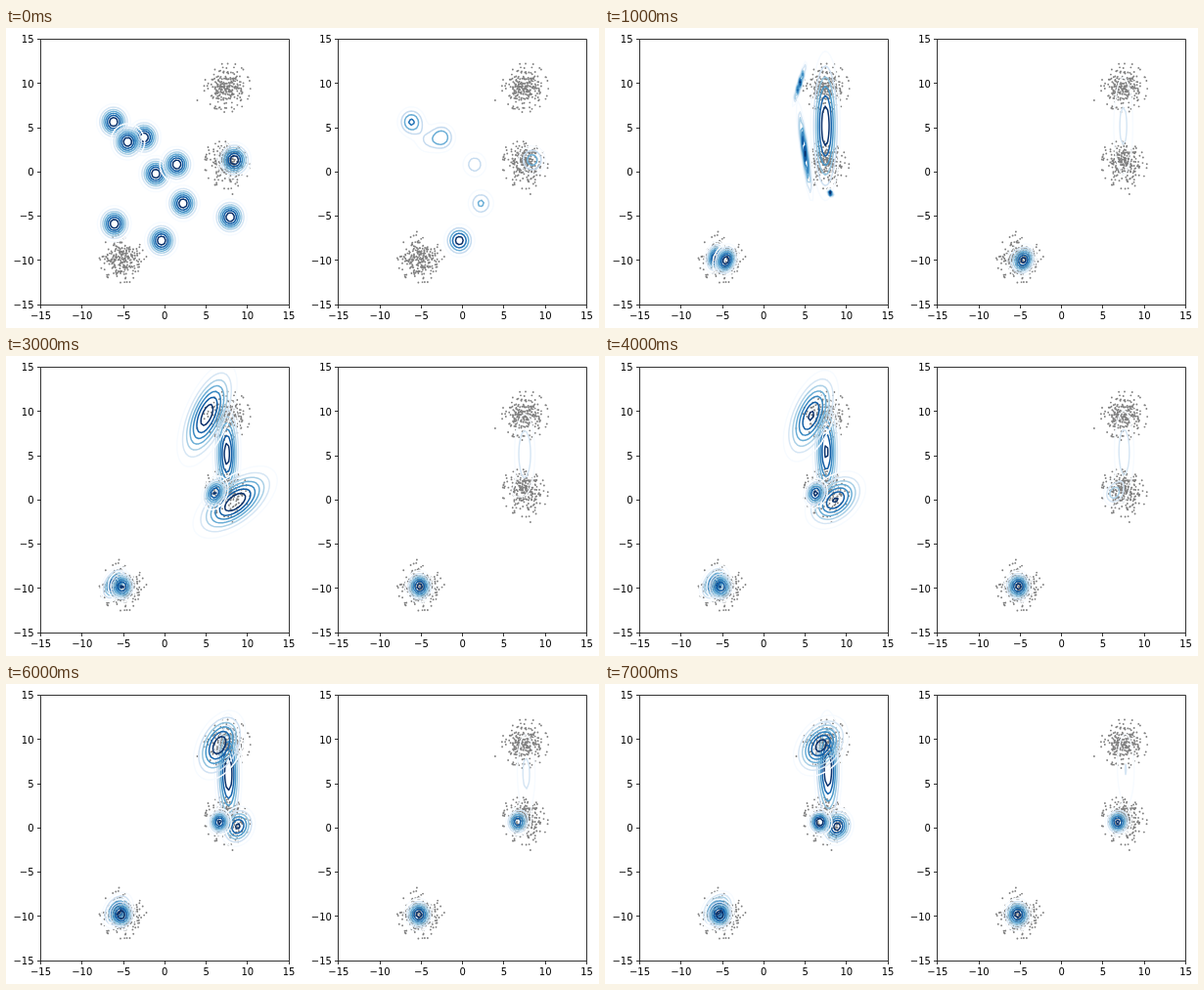
Recreate the animation shown at these times as an HTML page. Size 606x307 px, loop 8 s.

```html
<!DOCTYPE html>
<html lang="en">
<head>
<meta charset="utf-8">
<title>Gaussian mixture fit</title>
<style>
  html, body { margin: 0; width: 100%; height: 100%; overflow: hidden; background: #fff; }
  svg { display: block; width: 606px; height: 307px; }
  text { font: 10px "DejaVu Sans", sans-serif; fill: #000; }
</style>
</head>
<body>
<svg id="stage" viewBox="0 0 606 307" xmlns="http://www.w3.org/2000/svg"></svg>
<script>
const W = 253.6, H = 271.8, TOP = 11.4, LEFTS = [35.5, 339.9];
const STEP_MS = 1000, STATES = 8, N = 100;
const px = x => (x + 15) / 30 * W;
const py = y => TOP + (15 - y) / 30 * H;

// Colour ramp from near white to navy
const RAMP = ['f7fbff', 'deebf7', 'c6dbef', '9ecae1', '6baed6', '4292c6', '2171b5', '08519c', '08306b']
  .map(h => [0, 2, 4].map(i => parseInt(h.slice(i, i + 2), 16)));
function blue(t) {
  const i = Math.min(7, Math.floor(t * 8)), f = t * 8 - i;
  return 'rgb(' + RAMP[i].map((v, k) => Math.round(v + (RAMP[i + 1][k] - v) * f)).join() + ')';
}

// First state: unit Gaussians as x, y, weight
const START = [
  [-6.2, 5.65, 4.2], [-2.5, 3.9, 3.8], [-4.5, 3.4, 1.6], [-1.1, -0.2, 0.1], [1.45, 0.85, 2.6],
  [8.4, 1.35, 3.6], [2.2, -3.55, 3.2], [7.9, -5.1, 0.1], [-6.1, -5.85, 0.1], [-0.4, -7.75, 5.6]
].map(([x, y, w]) => [x, y, 1, 1, 0, w]);

// Tracks of later states: state, x, y, sx, sy, correlation, weight
const lowLeft = [
  [1, -5.9, -9.65, 0.62, 0.9, 0.2, 1.5],
  [2, -6.35, -9.6, 0.75, 0.95, 0.5, 0.5],
  [3, -6.1, -9.5, 0.85, 1.0, 0.4, 0.3],
  [7, -5.6, -9.25, 1.0, 1.05, 0.3, 0.2]
];
const lowMain = [
  [1, -4.6, -9.98, 0.76, 0.9, 0.2, 7.4],
  [2, -5.15, -9.78, 0.82, 0.88, 0, 7.4],
  [7, -5.32, -9.8, 0.87, 0.9, 0, 7.4]
];
const tall = [
  [1, 7.45, 5.2, 0.9, 4.3, 0, 2.25],
  [2, 7.5, 5.2, 0.82, 3.25, 0, 2.9],
  [3, 7.5, 5.2, 0.85, 3.1, 0, 2.85],
  [5, 7.6, 5.7, 0.82, 3.5, -0.05, 2.5],
  [7, 7.75, 6.6, 0.84, 3.4, -0.05, 2.03]
];
const wide = [
  [1, 8.05, -2.4, 0.2, 0.24, -0.4, 0],
  [2, 7.05, -2.7, 4, 2.7, 0.65, 0],
  [3, 8.5, -0.25, 2.5, 2, 0.6, 0],
  [5, 8.8, 0.2, 1.2, 1.3, 0.2, 0],
  [7, 8.85, 0.15, 1, 1.05, 0.1, 0]
];
const upper = [
  [1, 4.35, 10, 0.45, 1.35, 0.93, 0],
  [2, 3.7, 7.8, 3.2, 5.2, 0.78, 0],
  [3, 5.1, 9.6, 1.8, 2.9, 0.6, 0],
  [5, 6.3, 9.4, 1.55, 2.3, 0.45, 0],
  [7, 6.9, 9.3, 1.65, 1.7, 0.35, 0]
];
const small = [
  [1, 4.95, 2.3, 0.5, 2.9, -0.86, 0],
  [2, 5.4, 0.65, 1.3, 1.6, 0.6, 0.3],
  [3, 6.05, 0.8, 0.8, 0.95, 0.25, 0.8],
  [5, 6.45, 0.7, 0.68, 0.75, 0.05, 6.2],
  [7, 6.75, 0.65, 0.74, 0.76, 0, 7.2]
];
const TRACKS = [lowLeft, lowMain, tall, wide, upper, small];

function at(track, s) {
  let i = 0;
  while (i < track.length - 2 && track[i + 1][0] <= s) i++;
  const a = track[i], b = track[i + 1], f = (s - a[0]) / (b[0] - a[0]);
  return a.slice(1).map((v, k) => v + (b[k + 1] - v) * f);
}
const parts = s => s ? TRACKS.map(t => at(t, s)) : START;

// Density of weighted Gaussians on a square grid
const coord = i => -15 + 30 * i / (N - 1);
function sample(list) {
  const z = new Float64Array(N * N);
  for (const [mx, my, sx, sy, r, w] of list)
    for (let j = 0; j < N; j++) {
      const v = (coord(j) - my) / sy;
      for (let i = 0; i < N; i++) {
        const u = (coord(i) - mx) / sx;
        z[j * N + i] += w * Math.exp(-(u * u - 2 * r * u * v + v * v) / (2 * (1 - r * r)));
      }
    }
  return z;
}

// Marching squares for one level
function outline(z, level) {
  let d = '';
  for (let j = 0; j < N - 1; j++)
    for (let i = 0; i < N - 1; i++) {
      const c = [[i, j], [i + 1, j], [i + 1, j + 1], [i, j + 1]];
      const v = c.map(([a, b]) => z[b * N + a]);
      const hi = v.filter(q => q > level).length;
      if (!hi || hi === 4) continue;
      const cuts = [];
      for (let k = 0; k < 4; k++) {
        const m = (k + 1) % 4;
        if ((v[k] > level) === (v[m] > level)) continue;
        const f = (level - v[k]) / (v[m] - v[k]);
        const x = coord(c[k][0] + (c[m][0] - c[k][0]) * f);
        const y = coord(c[k][1] + (c[m][1] - c[k][1]) * f);
        cuts.push(px(x).toFixed(2) + ' ' + py(y).toFixed(2));
      }
      for (let k = 0; k < cuts.length; k += 2) d += 'M' + cuts[k] + 'L' + cuts[k + 1];
    }
  return d;
}

function contours(z, step) {
  const n = Math.ceil(z.reduce((a, b) => Math.max(a, b)) / step) - 1;
  let out = '';
  for (let k = 1; k <= n; k++)
    out += `<path d="${outline(z, k * step)}" stroke="${blue(n > 1 ? (k - 1) / (n - 1) : 0)}"/>`;
  return out;
}

// Round step that splits a range into at most eight
function niceStep(max) {
  const raw = max / 8, mag = 10 ** Math.floor(Math.log10(raw));
  return mag * [1, 1.5, 2, 2.5, 3, 4, 5, 6, 8, 10].find(s => s * mag >= raw * 0.99999);
}

function single([x, y, sx, sy, r]) {
  const peak = 1 / (2 * Math.PI * sx * sy * Math.sqrt(1 - r * r));
  const z = sample([[x, y, sx, sy, r, peak]]);
  return contours(z, niceStep(z.reduce((a, b) => Math.max(a, b))));
}

// Seeded point clouds
let seed = 77;
function rnd() {
  seed = (seed * 16807) % 2147483647;
  return seed / 2147483647;
}
function cloud(cx, cy, spread, count) {
  let d = '';
  for (let n = 0; n < count; n++) {
    const r = Math.min(2.5, Math.sqrt(-2 * Math.log(rnd()))) * spread, a = rnd() * 2 * Math.PI;
    d += dot(px(cx + r * Math.cos(a)), py(cy + r * Math.sin(a)));
  }
  return d;
}
const dot = (x, y) => `M${x.toFixed(2)} ${y.toFixed(2)}h0`;
const strays = [[160, 74], [171, 122], [196, 170], [80, 208.5], [108, 234], [88, 260], [91, 260], [63, 234]];
const points = cloud(7.55, 9.55, 1.12, 250) + cloud(7.55, 0.85, 1.1, 250) +
  cloud(-5.2, -9.8, 1.08, 250) + strays.map(p => dot(...p)).join('');

function axes(left) {
  const snap = v => Math.floor(v) + 0.5;
  const x0 = snap(left), x1 = snap(left + W), y0 = snap(TOP), y1 = snap(TOP + H);
  let d = `M${x0} ${y0}H${x1}V${y1}H${x0}Z`, labels = '';
  for (let v = -15; v <= 15; v += 5) {
    const x = snap(left + px(v)), y = snap(py(v)), t = String(v).replace('-', '\u2212');
    d += `M${x} ${y1}v3.5M${x0} ${y}h-3.5`;
    labels += `<text x="${left + px(v)}" y="297.5" text-anchor="middle">${t}</text>` +
      `<text x="${left - 7}" y="${py(v) + 3.8}" text-anchor="end">${t}</text>`;
  }
  return `<path d="${d}" fill="none" stroke="#000" stroke-width=".8"/>${labels}`;
}

const stage = document.getElementById('stage');
stage.innerHTML = `<clipPath id="box"><rect y="${TOP}" width="${W}" height="${H}"/></clipPath>` +
  LEFTS.map(left => `<g transform="translate(${left})"><g clip-path="url(#box)" fill="none" stroke-linecap="round">
    <path d="${points}" stroke="#808080" stroke-width="1.9"/>
    <g class="rings" stroke-width="1.5"></g></g></g>${axes(left)}`).join('');

const rings = stage.querySelectorAll('.rings');
const scenes = Array.from({ length: STATES }, (_, s) => {
  const list = parts(s);
  return [list.map(single).join(''), contours(sample(list), 1)];
});

let shown = -1;
function draw(ms) {
  const s = Math.floor(ms / STEP_MS) % STATES;
  if (s === shown) return;
  shown = s;
  rings.forEach((g, i) => { g.innerHTML = scenes[s][i]; });
}
const begin = performance.now();
function tick() {
  draw(performance.now() - begin);
  requestAnimationFrame(tick);
}
tick();
</script>
</body>
</html>
```
